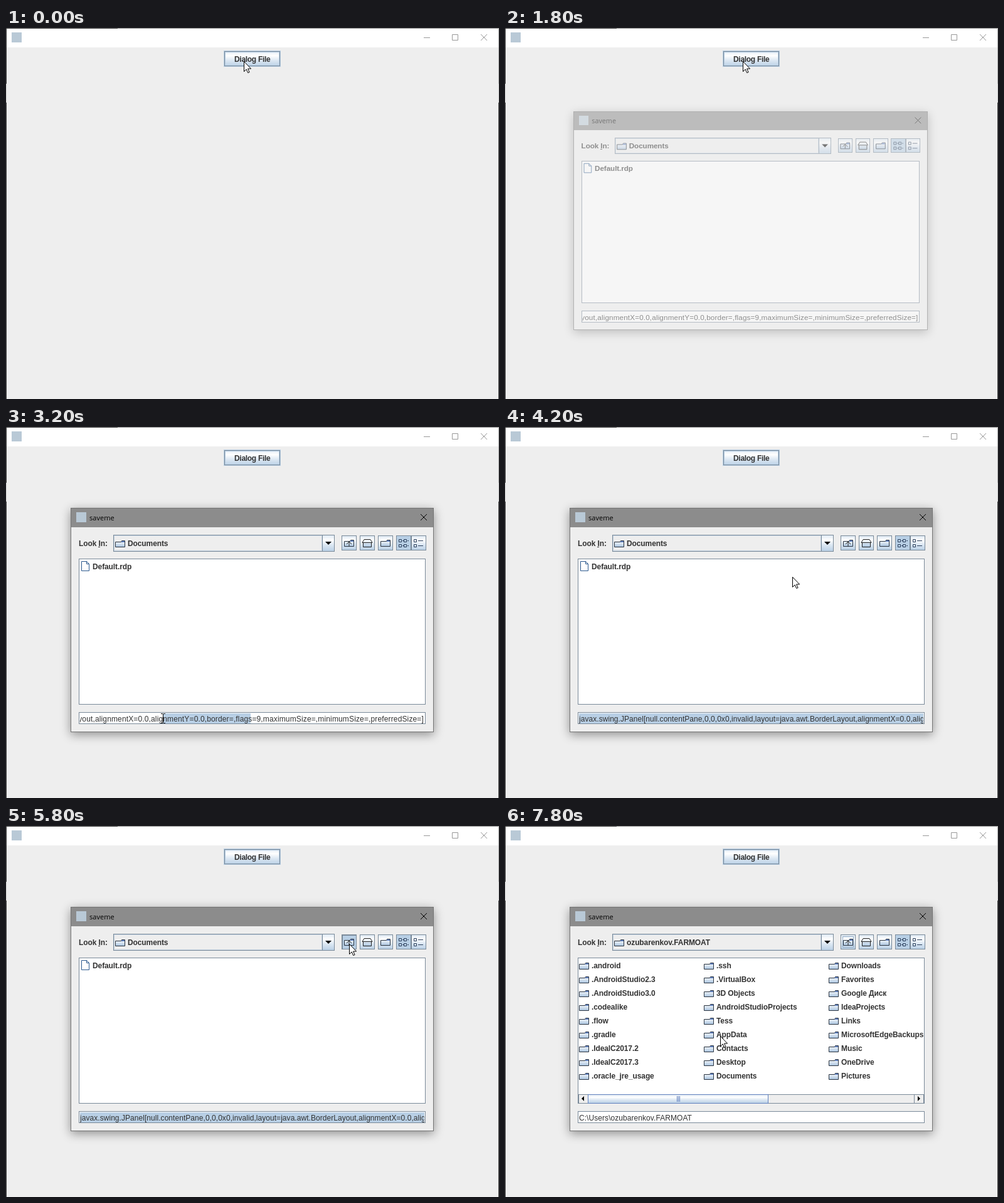
Write an HTML page that moves like this. It is 786 px wide and 592 px high and loops after 8000 ms.

```html
<!DOCTYPE html>
<html lang="en">
<head>
<meta charset="utf-8">
<style>
html, body { margin: 0; width: 100%; height: 100%; overflow: hidden; background: #eee; }
svg { display: block; }
text { font: bold 12px "Liberation Sans", Arial, sans-serif; letter-spacing: -.1px; fill: #333; white-space: pre; }
.plain { font-weight: normal; letter-spacing: .06px; }
.title { font: 11px "Open Sans", sans-serif; letter-spacing: .05px; fill: #000; }
#stage rect { shape-rendering: crispEdges; }
</style>
</head>
<body>
<svg id="stage" width="786" height="592" viewBox="0 0 786 592">
  <defs>
    <linearGradient id="ocean" x2="0" y2="1">
      <stop stop-color="#dde8f3"/><stop offset=".3" stop-color="#fff"/>
      <stop offset=".6" stop-color="#dde8f3"/><stop offset="1" stop-color="#b8cfe5"/>
    </linearGradient>
    <linearGradient id="soft" x2="0" y2="1">
      <stop stop-color="#fff"/><stop offset="1" stop-color="#a9c4e0"/>
    </linearGradient>
    <g id="folder">
      <path d="M.5 3.5h9l1-2h5v10h-15z" fill="url(#soft)" stroke="#2b3440"/>
      <path d="M10 2h5v2h-5z" fill="#6382bf"/>
    </g>
  </defs>
  <g id="window"></g>
  <g id="dialog"></g>
  <path id="arrow" d="M.5 .5v16l3.7-3.6 2.5 5.6 2.4-1-2.5-5.5h5z" fill="#fff" stroke="#000"/>
  <path id="beam" d="M0 .5h3m1 0h3M3.5 1v14M0 15.5h3m1 0h3" fill="none" stroke="#000"/>
</svg>
<script>
const EDGE = "#7a8a99", PALE = "#b8cfe5", LOOP = 8000, STEP = 200;
const USER = "ozubarenkov.FARMOAT";
const PANEL = "javax.swing.JPanel[null.contentPane,0,0,0x0,invalid,layout=java.awt.BorderLayout," +
  "alignmentX=0.0,alignmentY=0.0,border=,flags=9,maximumSize=,minimumSize=,preferredSize=]";
const FOLDERS = [
  ".android", ".AndroidStudio2.3", ".AndroidStudio3.0", ".codealike", ".flow", ".gradle",
  ".IdealC2017.2", ".IdealC2017.3", ".oracle_jre_usage",
  ".ssh", ".VirtualBox", "3D Objects", "AndroidStudioProjects", "Tess", "AppData",
  "Contacts", "Desktop", "Documents",
  "Downloads", "Favorites", "Google Диск", "IdeaProjects", "Links", "MicrosoftEdgeBackups",
  "Music", "OneDrive", "Pictures"];

// Pointer stops: time, x, y; each is held until the next one.
const POINTER = [
  [0, 379, 53], [2400, 390, 118], [2600, 406, 300], [2800, 398, 485],
  [3000, 387, 457], [3200, 247, 457], [3400, 91, 457], [3600, 83, 456],
  [4000, 300, 400], [4200, 458, 239], [4400, 472, 223], [4600, 486, 226],
  [4800, 525, 205], [5000, 550, 184], [5200, 547, 188],
  [7200, 470, 260], [7400, 345, 377], [7600, 311, 358], [7800, 343, 335]];

const $ = id => document.getElementById(id);
const rect = (x, y, w, h, fill, more = "") =>
  `<rect x="${x}" y="${y}" width="${w}" height="${h}" fill="${fill}" ${more}/>`;
const frame = (x, y, w, h, color, fill = "none") =>
  rect(x + .5, y + .5, w - 1, h - 1, fill, `stroke="${color}"`);
const line = (d, color, fill = "none") => `<path d="${d}" stroke="${color}" fill="${fill}"/>`;
const text = (x, y, s, cls = "", more = "") => `<text x="${x}" y="${y}" class="${cls}" ${more}>${s}</text>`;
const folder = (x, y) => `<use href="#folder" x="${x}" y="${y}"/>`;
const group = (id, body) => `<g id="${id}">${body}</g>`;
const cross = (x, y) => `M${x} ${y}l10 10m0-10l-10 10`;
const pressed = (x, y, w, h) =>
  rect(x, y, w, h, PALE) + frame(x, y, w, h, EDGE) + rect(x, y, w, 2, EDGE) + rect(x, y, 2, h, EDGE);

function windowParts() {
  const controls = color => line("M666 15.5h10M711.5 10.5h9v9h-9z" + cross(757, 10), color);
  const idle = rect(0, 0, 786, 31, "#fff") + rect(0, 0, 178, 1, "#333") + rect(178, 0, 608, 1, "#8a8a8a") +
    [0, 785].map(x => rect(x, 0, 1, 89, x ? "#aaa" : "#333") + rect(x, 89, 1, 30, "#ccc") +
      rect(x, 119, 1, 473, "#3a3a3a")).join("") + controls("#999");
  const active = rect(0, 0, 786, 31, "#8c8c8c") + frame(0, 0, 786, 600, "#7a7a7a") + controls("#000");
  const hover = frame(347, 36, 91, 26, PALE, "url(#ocean)") + frame(349, 38, 87, 22, PALE) +
    frame(348, 37, 89, 24, EDGE);
  const down = pressed(347, 36, 91, 26) + frame(363, 40, 59, 18, "#99b4d1");
  return rect(0, 0, 786, 592, "#eee") + group("idle", idle + hover) + group("active", active + down) +
    rect(9, 7, 16, 16, "#b9c9d6") + text(364, 54, "Dialog File", "", 'style="letter-spacing:-.3px"');
}

function toolbar() {
  const tool = (x, fill = "url(#ocean)") => frame(x, 173, 24, 24, EDGE, fill);
  const box = (x, y) => `M${x}.5 ${y}.5h4v4h-4z`;
  return tool(535) + group("upDown", pressed(535, 173, 24, 24)) +
    group("upFocus", frame(538, 176, 18, 18, "#8fa9c4")) +
    folder(539, 179) + line("M543 187l4-4 4 4M547 184v6", "#222") +
    tool(564) + line("M568 184.5l3-5h10l3 5zM569.5 185v6.5h13v-6.5", "#222", "url(#soft)") +
    tool(593) + folder(597, 179) + tool(622, PALE) + tool(646) +
    line([626, 634].map(x => [179, 187].map(y => box(x, y) + `M${x + 6} ${y + 2.5}h2`).join("")).join(""), "#2b3f5c") +
    line(box(650, 179) + box(650, 187) + "M657 181.5h8M657 189.5h8", "#2b3f5c");
}

function listing() {
  const entry = (name, i) => {
    const x = 118 + 199 * Math.floor(i / 9), y = 227 + 22 * (i % 9);
    return folder(x, y - 10) + text(x + 20, y, name);
  };
  const bar = rect(117, 428, 551, 15, "#eee") + frame(117, 428, 551, 15, EDGE) +
    frame(117, 428, 16, 15, EDGE, "#eee") + frame(652, 428, 16, 15, EDGE, "#eee") +
    frame(132, 428, 288, 15, "#6382bf", "url(#ocean)") +
    line("M274.5 431v9m2-9v9m2-9v9", "#6382bf") +
    '<path d="M126 431v8l-4-4zM658 431v8l4-4z"/>';
  return FOLDERS.map(entry).join("") + bar;
}

function dialogParts() {
  return rect(103, 129, 579, 358, "#eee", 'style="filter:drop-shadow(0 4px 8px rgba(0,0,0,.4))"') +
    rect(103, 129, 579, 31, "#8c8c8c") + frame(103, 129, 579, 358, "#747474") +
    rect(112, 136, 16, 16, "#b9c9d6") + text(133, 149, "saveme", "title") + line(cross(661, 139), "#000") +
    text(116, 190, "Look In:") + rect(147, 191, 3, 1, "#333") +
    frame(171, 172, 353, 27, EDGE, "#eee") + frame(172, 173, 332, 25, "#c4d3e2") +
    frame(504, 172, 20, 27, EDGE, "url(#ocean)") + '<path d="M509 183h10l-5 5z"/>' +
    folder(174, 180) + text(194, 190, "", "", 'id="place"') + toolbar() +
    frame(116, 210, 553, 233, EDGE, "#fff") +
    group("file", line("M120.5 214.5h8l4 4v11h-12zM128.5 214.5v4h4", "#2d5a8e", "#fff") +
      text(138, 227, "Default.rdp")) +
    group("listing", listing()) +
    frame(116, 455, 553, 19, EDGE, "#fff") +
    '<svg x="118" y="457" width="549" height="16">' + rect(0, 0, 0, 16, PALE, 'id="select"') +
    text(0, 13, "", "plain", 'id="field"') + rect(0, 0, 1, 16, "#000", 'id="caret"') + "</svg>";
}

$("window").innerHTML = windowParts();
$("dialog").innerHTML = dialogParts();

const show = (id, on) => $(id).setAttribute("visibility", on ? "inherit" : "hidden");
const set = (id, attrs) => { for (const k in attrs) $(id).setAttribute(k, attrs[k]); };

function drawField(t, listed) {
  const atEnd = t < 3800;
  $("field").textContent = listed ? "C:\\Users\\" + USER : PANEL;
  $("field").style.letterSpacing = listed ? "" : atEnd ? ".14px" : ".05px";
  set("field", { x: !atEnd ? 0 : t < 3600 ? 548 : 760, "text-anchor": atEnd ? "end" : "start" });
  const [from, to] = t < 3200 || listed ? [0, 0] : t < 3400 ? [132, 272] : t < 3600 ? [0, 272] :
    t < 3800 ? [0, 484] : [0, 549];
  set("select", { x: from, width: to - from });
  show("caret", t >= 4800 && t < 5200 || t >= 5600 && t < 5800);
}

function draw(now) {
  const t = Math.floor(now % LOOP / STEP) * STEP;
  const active = t >= 1000 && t < 1800, fading = t === 1800, listed = t >= 6000;
  show("active", active);
  show("idle", !active);
  show("dialog", t >= 1800);
  set("dialog", {
    opacity: fading ? .5 : 1,
    transform: fading ? "translate(391.5 307.5) scale(.976) translate(-392.5 -308)" : ""
  });
  $("place").textContent = listed ? USER : "Documents";
  show("file", !listed);
  show("listing", listed);
  show("upDown", t === 5800);
  show("upFocus", t >= 6200);
  drawField(t, listed);

  const [, x, y] = POINTER.findLast(p => p[0] <= t);
  const inField = t >= 3000 && t < 4000;
  show("arrow", !inField);
  show("beam", inField);
  set(inField ? "beam" : "arrow", { transform: `translate(${x} ${y})` });
}

const start = performance.now();
function tick() {
  draw(performance.now() - start);
  requestAnimationFrame(tick);
}
tick();
</script>
</body>
</html>
```
